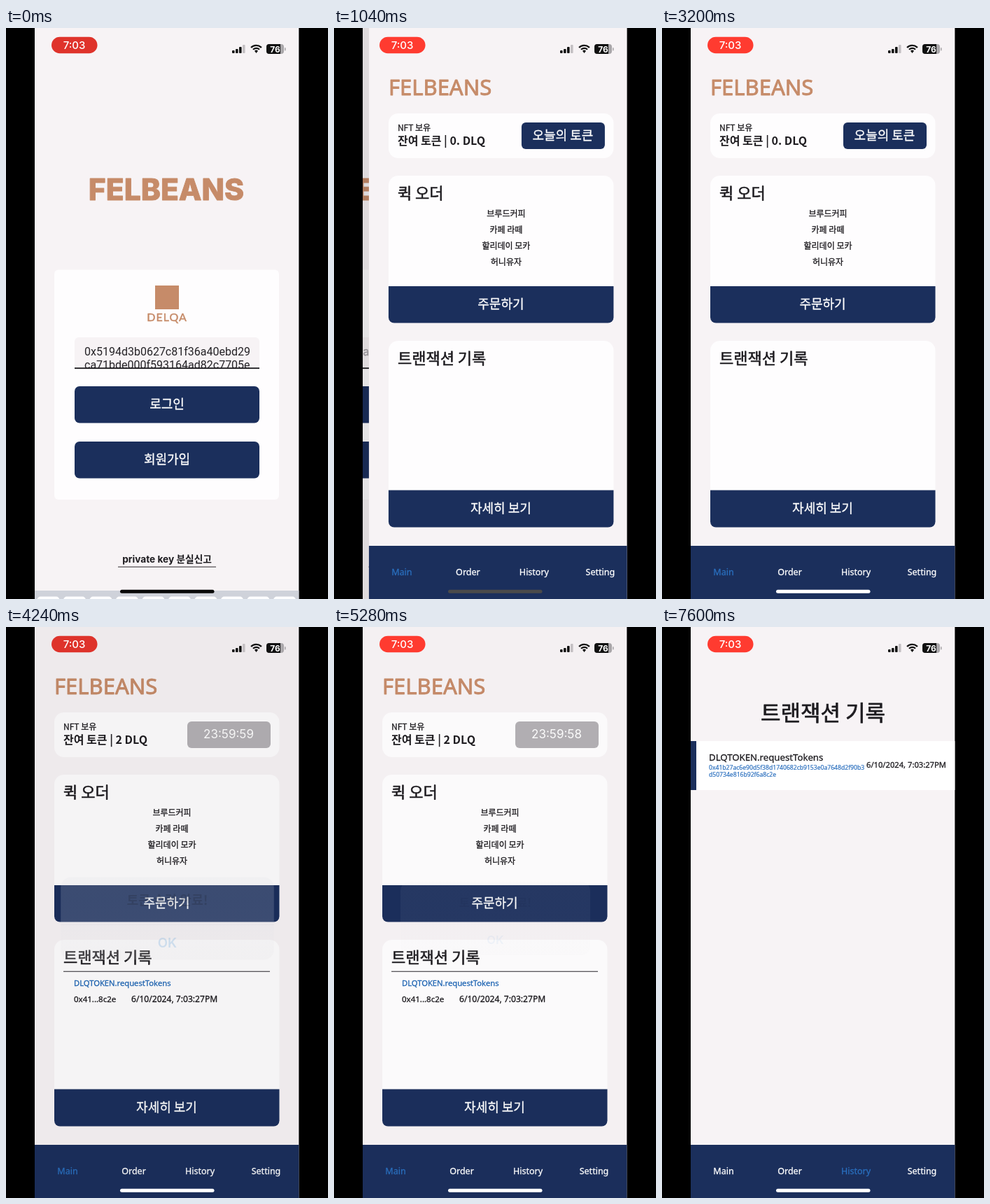
Write an HTML page with a canvas that moves like this. It is 460x816 px and loops after 7680 ms.

```html
<!DOCTYPE html>
<html lang="ko">
<head>
<meta charset="utf-8">
<style>
html, body { margin: 0; width: 100%; height: 100%; overflow: hidden; background: #000; }
canvas { display: block; filter: blur(0.4px); }
</style>
</head>
<body>
<canvas id="stage" width="460" height="816"></canvas>
<script>
const ctx = document.getElementById('stage').getContext('2d');
const LOOP = 7680, STEP = 80;
const LEFT = 41, WIDTH = 377.6, HEIGHT = 816;
const PUSH = 800, REWARD = 4160, DISMISS = 5040, HISTORY = 6880;

const KR = '"Noto Sans CJK KR", "Noto Sans CJK", sans-serif';
const NOTO = '"Noto Sans", sans-serif';
const INTER = 'Inter, "Noto Sans CJK KR", sans-serif';
const BG = '#f7f3f5', CARD = '#fefdfe', NAVY = '#1b2f5c', BRONZE = '#c68b69';
const INK = '#1e1c20', BLUE = '#2a6fbe';

const clamp = v => Math.min(1, Math.max(0, v));
const smooth = v => { v = clamp(v); return v * v * (3 - 2 * v); };
const mix = (a, b, k) => a + (b - a) * k;

function rect(x, y, w, h, color) {
  ctx.fillStyle = color;
  ctx.fillRect(x, y, w, h);
}

function round(x, y, w, h, r, color) {
  ctx.fillStyle = color;
  ctx.beginPath();
  ctx.roundRect(x, y, w, h, r);
  ctx.fill();
}

// bold: outline width that thickens the strokes of the regular weight
function text(str, x, y, size, color, { font = KR, weight = 400, align = 'left', space = 0, bold = 0.3 } = {}) {
  ctx.font = `${weight} ${size}px ${font}`;
  ctx.letterSpacing = space + 'px';
  ctx.textAlign = align;
  ctx.fillStyle = ctx.strokeStyle = color;
  ctx.lineJoin = 'round';
  ctx.fillText(str, x, y);
  ctx.lineWidth = bold;
  if (bold) ctx.strokeText(str, x, y);
}

const center = (str, x, y, size, color, opt) => text(str, x, y, size, color, { ...opt, align: 'center' });

function drawLogin(cleared) {
  rect(LEFT, 0, WIDTH, HEIGHT, BG);
  center('FELBEANS', 229, 246, 42.5, BRONZE, { font: INTER, weight: 800, bold: 0.9 });
  round(69, 345.5, 321, 328.5, 6, CARD);
  rect(213, 368, 34, 34, BRONZE);
  center('DELQA', 230, 419, 16, BRONZE, { font: 'Lato, sans-serif', space: 1, bold: 0.5 });

  round(98, 442, 264, 45, [6, 6, 0, 0], BG);
  ctx.save();
  ctx.beginPath();
  ctx.rect(98, 442, 264, 45);
  ctx.clip();
  if (cleared) {
    text('private key를 입력해주세요', 123, 468, 16, '#a5a2a6', { font: INTER });
  } else {
    const key = { font: 'Roboto, sans-serif', bold: 0 };
    text('0x5194d3b0627c81f36a40ebd29', 112, 468, 16, '#252327', key);
    text('ca71bde000f593164ad82c7705e', 112, 487, 16, '#252327', key);
  }
  ctx.restore();
  rect(98, 485.3, 264, 1.8, '#19171b');

  round(98, 512, 264, 52.5, 7, NAVY);
  center('로그인', 230, 544, 18, '#fff');
  round(98, 591, 264, 52.5, 7, NAVY);
  center('회원가입', 230, 623, 18, '#fff');
  center('private key 분실신고', 230, 764, 13.7, INK, { font: INTER, weight: 700, bold: 0 });
  rect(160, 769.5, 140, 1.3, '#5c595d');
}

function drawKeyboard(y) {
  if (y >= HEIGHT) return;
  rect(LEFT, y, WIDTH, HEIGHT - y, '#cfd2da');
  for (let i = 0; i < 10; i++) round(44.5 + i * 37.5, y + 8.5, 32, 42, 5, '#fdfdfe');
}

function drawTabs(active) {
  rect(LEFT, 740, WIDTH, 76, NAVY);
  ['Main', 'Order', 'History', 'Setting'].forEach((name, i) =>
    center(name, 88 + i * 94.5, 781.5, 12.5, name === active ? BLUE : '#fff', { font: NOTO, weight: 500 }));
}

function footer(label, y, h, base) {
  round(69, y, 321.5, h, [0, 0, 8, 8], NAVY);
  center(label, 229.5, base, 18, '#fff');
}

function drawMain(t) {
  const rewarded = t >= REWARD;
  rect(LEFT, 0, WIDTH, HEIGHT, BG);
  text('FELBEANS', 69, 96, 31, BRONZE, { font: NOTO, weight: 500, bold: 0.9 });

  round(69, 122, 321.5, 64, 14, CARD);
  text('NFT 보유', 82, 146.5, 12, INK);
  text(`잔여 토큰 | ${rewarded ? '2' : '0.'} DLQ`, 82, 167, 16, INK, { weight: 700, bold: 0 });
  round(259, 135, 119, 38, 6, rewarded ? '#b3b0b4' : NAVY);
  if (rewarded) {
    const left = t < 5040 ? 59 : t < 6040 ? 58 : 57;
    center('23:59:' + left, 318, 158.5, 17, '#fff', { font: INTER, bold: 0 });
  } else {
    center('오늘의 토큰', 318, 159.5, 18, '#fff');
  }

  round(69, 211, 321.5, 210, 14, CARD);
  text('퀵 오더', 82, 244, 22, INK, { bold: 0.6 });
  ['브루드커피', '카페 라떼', '할리데이 모카', '허니유자'].forEach((item, i) =>
    center(item, 237, 269.5 + i * 23.3, 12, INK));
  footer('주문하기', 369, 52.5, 401);

  round(69, 447, 321.5, 266, 14, CARD);
  text('트랜잭션 기록', 82, 480, 22, INK, { bold: 0.6 });
  if (rewarded) {
    rect(82, 491.7, 295, 1.2, '#4b494d');
    text('DLQTOKEN.requestTokens', 97, 513, 11.2, '#1f66b5', { font: NOTO });
    text('0x41...8c2e', 97, 536, 11.5, INK, { font: NOTO });
    text('6/10/2024, 7:03:27PM', 179, 536, 12.1, INK, { font: NOTO });
  }
  footer('자세히 보기', 660.5, 53, 692.5);
  drawTabs('Main');
}

function drawHistory() {
  rect(LEFT, 0, WIDTH, HEIGHT, BG);
  center('트랜잭션 기록', 230, 134, 31, INK, { bold: 0.7 });
  rect(LEFT, 163, WIDTH, 70, '#fff');
  rect(LEFT, 163, 8, 70, NAVY);
  text('DLQTOKEN.requestTokens', 67, 191, 13.2, INK, { font: NOTO });
  text('0x41b27ac6e90d5f38d1740682cb9153e0a7648d2f90b3', 67, 203.5, 8.6, BLUE, { font: NOTO, bold: 0.2 });
  text('d50734e816b92f6a8c2e', 67, 214, 8.6, BLUE, { font: NOTO, bold: 0.2 });
  text('6/10/2024, 7:03:27PM', 292, 201, 11.2, INK, { font: NOTO });
  drawTabs('History');
}

function drawAlert(t) {
  const shown = smooth((t - REWARD) / 300);
  const alpha = shown * (1 - smooth((t - DISMISS) / 280));
  if (alpha <= 0) return;
  rect(LEFT, 0, WIDTH, HEIGHT, `rgba(0,0,0,${0.2 * alpha})`);

  const scale = mix(1.15, 1, shown);
  ctx.save();
  ctx.globalAlpha = alpha;
  ctx.translate(230.5, 416.5);
  ctx.scale(scale, scale);
  ctx.translate(-230.5, -416.5);
  const glass = ctx.createLinearGradient(0, 364, 0, 469);
  glass.addColorStop(0, '#dcdee4');
  glass.addColorStop(0.3, '#d4dae6');
  glass.addColorStop(0.55, '#dbdfe8');
  glass.addColorStop(0.78, '#e3e2e6');
  glass.addColorStop(1, '#dfdde0');
  round(95, 364, 271, 105, 13, glass);
  rect(95, 424, 271, 0.8, '#c3c7d0');
  center('토큰 수령 완료!', 230.5, 399.5, 16.3, '#19181c', { weight: 700, bold: 0 });
  center('OK', 230.5, 453, 16.5, '#2480d2', { font: INTER, weight: 600, bold: 0 });
  ctx.restore();
}

function drawStatus(t) {
  const glow = 0.5 + 0.5 * Math.cos((t - 5360) / 2200 * Math.PI * 2);
  round(65, 12.7, 65.5, 23.6, 11.8,
    `rgb(${mix(222, 255, glow)},${mix(51, 59, glow)},${mix(43, 48, glow)})`);
  center('7:03', 97.5, 30, 15, '#fff', { font: INTER, weight: 500, bold: 0 });

  [4, 6, 9, 12].forEach((h, i) =>
    round(323 + i * 5, 36 - h, 3.6, h, 1, i < 3 ? '#111' : '#c4c0c3'));

  ctx.strokeStyle = '#111';
  ctx.lineWidth = 2.3;
  for (const r of [6.2, 10.2]) {
    ctx.beginPath();
    ctx.arc(357.5, 35, r, -Math.PI * 0.76, -Math.PI * 0.24);
    ctx.stroke();
  }
  ctx.fillStyle = '#111';
  ctx.beginPath();
  ctx.moveTo(357.5, 36);
  ctx.arc(357.5, 35, 3.4, -Math.PI * 0.76, -Math.PI * 0.24);
  ctx.fill();

  round(372, 23, 25, 14, 4, '#aaa7aa');
  round(372, 23, 20, 14, [4, 0, 0, 4], '#111');
  round(398, 28, 1.6, 4.5, 1, '#aaa7aa');
  center('76', 384.5, 34.5, 12, '#fff', { font: INTER, weight: 700, bold: 0 });
}

function drawIndicator(t) {
  const v = mix(8, 255, clamp((t - PUSH) / 900));
  round(163, 802.7, 134.5, 5, 2.5, `rgb(${v},${v},${v})`);
}

function draw(t) {
  rect(0, 0, 460, HEIGHT, '#000');
  ctx.save();
  ctx.beginPath();
  ctx.rect(LEFT, 0, WIDTH, HEIGHT);
  ctx.clip();

  const k = Math.max(0, t - PUSH) * 0.0235;
  const rest = (1 + k) * Math.exp(-k);
  if (t >= HISTORY) {
    drawHistory();
  } else {
    if (rest > 0.001) {
      ctx.save();
      ctx.translate(-0.3 * WIDTH * (1 - rest), 0);
      drawLogin(t > PUSH);
      ctx.restore();
      rect(LEFT, 0, WIDTH, HEIGHT, `rgba(0,0,0,${0.1 * (1 - rest)})`);
      drawKeyboard(804 + t * 0.08);
    }
    if (rest < 1) {
      ctx.save();
      ctx.translate(rest > 0.001 ? WIDTH * rest : 0, 0);
      drawMain(t);
      ctx.restore();
    }
    drawAlert(t);
  }
  drawStatus(t);
  drawIndicator(t);
  ctx.restore();
}

const start = performance.now();
function tick() {
  const t = (performance.now() - start) % LOOP;
  draw(Math.floor(t / STEP) * STEP);
  requestAnimationFrame(tick);
}
tick();
</script>
</body>
</html>
```
